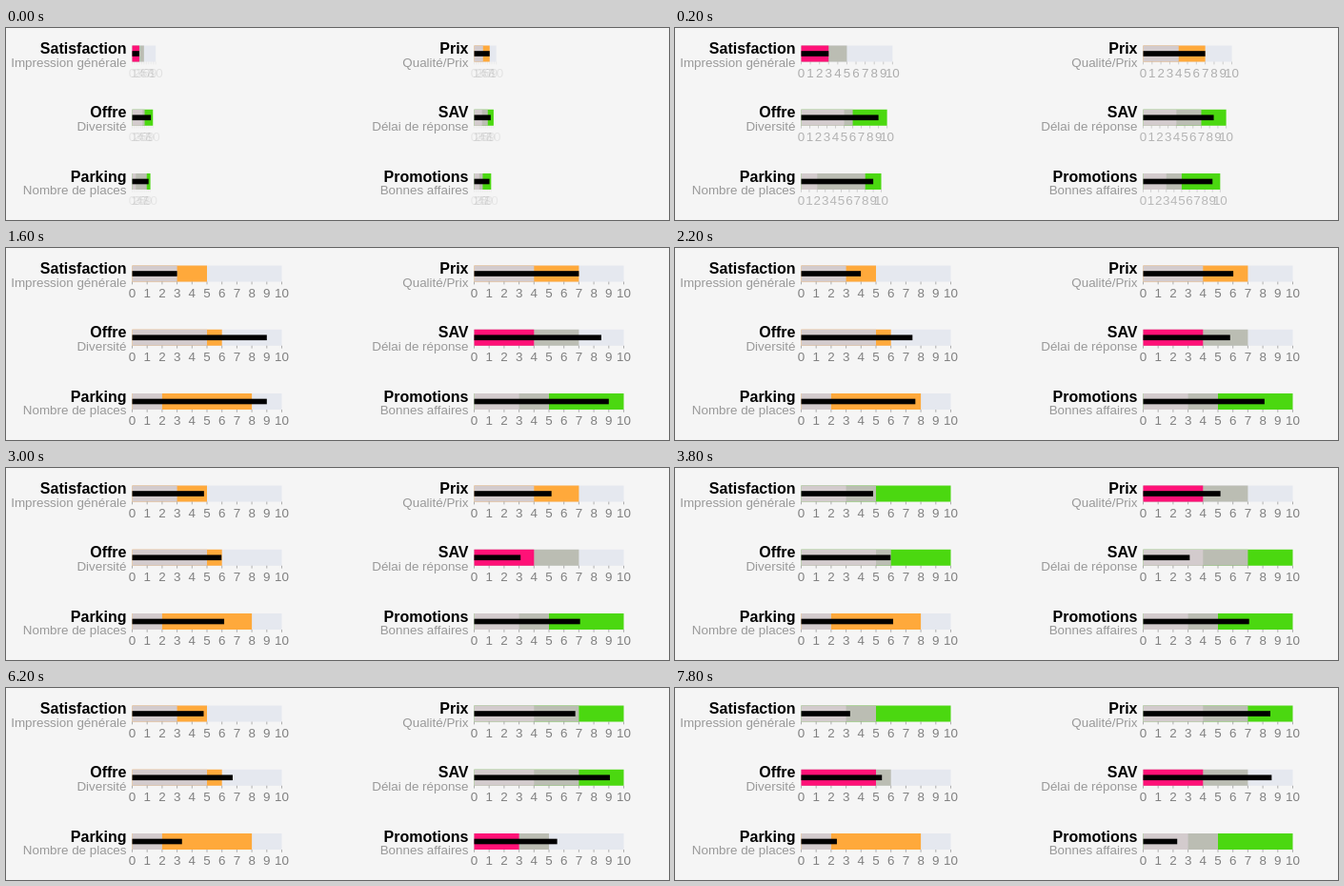
Write an HTML page that moves like this. It is 696 px wide and 202 px high and loops after 8000 ms.

```html
<!DOCTYPE html>
<html lang="fr">
<head>
<meta charset="utf-8">
<title>Bullet charts</title>
<style>
  html, body { margin: 0; width: 100%; height: 100%; overflow: hidden; background: #f5f5f5; }
  svg { display: block; width: 696px; height: 202px; font-family: "Liberation Sans", Arial, sans-serif; }
  .title { font-size: 16px; font-weight: bold; text-anchor: end; }
  .sub { font-size: 13.4px; fill: #999; text-anchor: end; }
  .tick text { font-size: 13.4px; fill: #808080; text-anchor: middle; }
  .tick line { stroke: #666; stroke-width: .5; }
</style>
</head>
<body>
<svg id="stage" viewBox="0 0 696 202"></svg>
<script>
const LOOP = 8000, HOLD = 200, STAGGER = 7;
const UNIT = 15.7, H = 17;
const BASE = ['#d3cbcd', '#bbbdb3', '#e5e8ef'];
const ACTIVE = ['#ff1177', '#ffa93b', '#4bd810'];

// [start, duration] of each update, in ms
const STEPS = [[-340, 1000], [1590, 1180], [3700, 1080], [5590, 1100], [7700, 1000]];

// Title, subtitle, two limits, value after each update
const CHARTS = [
  ['Satisfaction', 'Impression générale', [3, 5], [3, 4.8, 7.55, 3.26, 6]],
  ['Prix', 'Qualité/Prix', [4, 7], [7, 5.17, 3.79, 8.5, 9]],
  ['Offre', 'Diversité', [5, 6], [9, 5.97, 8.82, 5.4, 4]],
  ['SAV', 'Délai de réponse', [4, 7], [8.5, 3.1, 9.78, 8.6, 3]],
  ['Parking', 'Nombre de places', [2, 8], [9, 6.15, 4.65, 2.38, 5]],
  ['Promotions', 'Bonnes affaires', [3, 5], [9, 7.08, 9.81, 2.27, 7]]
];

const stage = document.getElementById('stage');

function add(parent, tag, attrs, text) {
  const el = document.createElementNS('http://www.w3.org/2000/svg', tag);
  for (const k in attrs) el.setAttribute(k, attrs[k]);
  if (text !== undefined) el.textContent = text;
  parent.appendChild(el);
  return el;
}

function ease(t) {
  t = Math.min(1, Math.max(0, t));
  return t < .5 ? 4 * t ** 3 : 1 - 4 * (1 - t) ** 3;
}

function makeChart([title, sub, limits, values], i) {
  const x = i % 2 ? 491.5 : 132.5;
  const y = 18.5 + Math.floor(i / 2) * 67.25;
  const g = add(stage, 'g', { transform: `translate(${x} ${y})` });
  const ends = [...limits, 10];
  const bands = [];
  for (let b = 2; b >= 0; b--) bands[b] = add(g, 'rect', { height: H });
  const bar = add(g, 'rect', { y: H / 3, height: H / 3 });
  const ticks = Array.from({ length: 11 }, (_, n) => {
    const tick = add(g, 'g', { class: 'tick' });
    add(tick, 'line', { y1: H, y2: H * 7 / 6 });
    add(tick, 'text', { y: 33.2 }, n);
    return tick;
  });
  add(g, 'text', { class: 'title', x: -6, y: H / 2 }, title);
  add(g, 'text', { class: 'sub', x: -6, y: H / 2 + 13.7 }, sub);

  return time => {
    const k = STEPS.findLastIndex(s => time >= s[0]);
    const [start, dur] = STEPS[k];
    const e = ease((time - start - i * STAGGER) / dur);
    const grow = k ? 1 : e;
    const target = values[k];
    const value = k ? values[k - 1] + (target - values[k - 1]) * e : target * e;
    const zone = ends.findIndex(end => target <= end);

    bands.forEach((band, b) => {
      band.setAttribute('width', ends[b] * UNIT * grow);
      band.setAttribute('fill', b === zone ? ACTIVE[b] : BASE[b]);
    });
    bar.setAttribute('width', value * UNIT);
    ticks.forEach((tick, n) => {
      tick.setAttribute('transform', `translate(${n * UNIT * grow} 0)`);
      tick.setAttribute('opacity', grow);
    });
  };
}

const charts = CHARTS.map(makeChart);

const hand = add(stage, 'path', {
  transform: 'translate(103 86)',
  d: 'M3 8V1.5q1-1.5 2 0V5q1-1 2 .3q1-.8 1.8.5q1.4-.4 1.4 1V10L9 13H4.5L1 8.5Q1 7 3 8Z',
  fill: '#fff', stroke: '#222', 'stroke-width': .8
});

const origin = performance.now();

function draw(now) {
  const t = Math.max(0, now - origin) % LOOP;
  const time = Math.floor(t / HOLD) * HOLD;
  charts.forEach(update => update(time));
  hand.setAttribute('visibility', time >= 400 && time < 1000 ? 'visible' : 'hidden');
  requestAnimationFrame(draw);
}
draw(origin);
</script>
</body>
</html>
```
